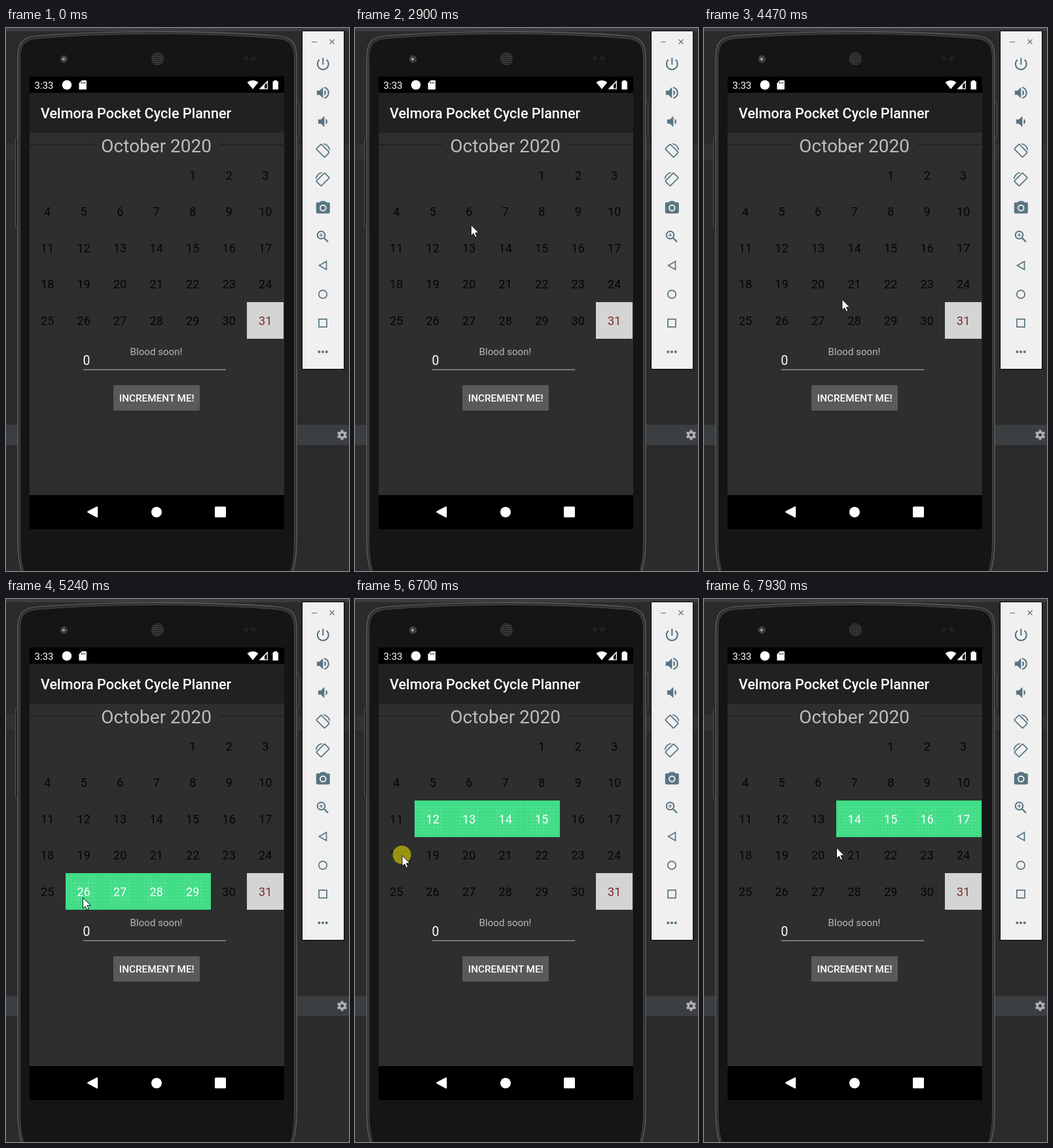
An HTML page for the animation above (8000 ms loop, 524 by 830 pixels).

```html
<!DOCTYPE html>
<html lang="en">
<head>
<meta charset="utf-8">
<title>Calendar demo</title>
<style>
  html, body { margin: 0; width: 100%; height: 100%; overflow: hidden; background: #2b2b2b; }
  svg { display: block; width: 524px; height: 830px; font-family: Roboto, sans-serif; }
  .medium { font-weight: 500; fill: #fff; }
  .mid { text-anchor: middle; }
  .line { fill: none; stroke: #587482; stroke-width: 1.7; }
  .icon { fill: #587482; }
  .crisp { shape-rendering: crispEdges; }
</style>
</head>
<body>
<svg viewBox="0 0 524 830">
  <defs>
    <pattern id="mesh" width="3" height="3" patternUnits="userSpaceOnUse">
      <rect width="3" height="3" fill="#1c1c1c"/>
      <circle cx="1.5" cy="1.5" r="1" fill="#555"/>
    </pattern>
  </defs>

  <!-- editor behind the phone -->
  <rect width="524" height="830" fill="#2b2b2b"/>
  <rect width="524" height="5" fill="#3a3c3e"/>
  <rect y="177" width="524" height="24" fill="#323232"/>
  <rect y="606.5" width="524" height="31" fill="#3c3f41"/>
  <g transform="translate(513.5 622)" fill="none" stroke="#afb1b3">
    <circle r="4.3" stroke-width="3.4"/>
    <circle r="6.6" stroke-width="2.4" pathLength="12" stroke-dasharray="1 1" stroke-dashoffset="1.5"/>
  </g>

  <!-- phone -->
  <rect x="14.5" y="168" width="4" height="136" rx="1.5" fill="#222" stroke="#555"/>
  <rect x="443" y="113" width="4.5" height="55" rx="1.5" fill="#222" stroke="#555"/>
  <path d="M25 834Q18 815 18 785V45C18 22 26 14 46 12Q130 5.500 231 5.500T416 12C436 14 444 22 444 45V785Q444 815 437 834Z" fill="#303030" stroke="#646464" stroke-width="1.200"/>
  <path d="M28 834Q21.500 815 21.500 785V46C21.500 26 29 18 47 16Q130 9 231 9T415 16C433 18 440.500 26 440.500 46V785Q440.500 815 434 834Z" fill="#151515" stroke="#484848"/>
  <circle cx="88.500" cy="47.500" r="5" fill="#383838" stroke="#555"/>
  <circle cx="88" cy="47.500" r="2.300" fill="#999"/>
  <circle cx="231.500" cy="47" r="10" fill="url(#mesh)"/>
  <g fill="#202020"><circle cx="366.500" cy="46.500" r="3.500"/><circle cx="378" cy="46.500" r="4"/></g>

  <!-- screen -->
  <rect x="36" y="74" width="389" height="692" fill="#000"/>
  <rect x="36" y="99" width="389" height="61" fill="#212121"/>
  <rect x="36" y="160" width="389" height="554" fill="#2e2e2e"/>
  <g fill="#fff">
    <text x="43.500" y="92.500" font-size="15.100">3:33</text>
    <circle cx="93" cy="87" r="7.300"/>
    <path d="M116 80h6q1 0 1 1v12q0 1-1 1h-9.500q-1 0-1-1v-8.500z"/>
    <path d="M115.500 82.500v2.500M118 82.500v2.500M120.500 82.500v2.500" stroke="#000"/>
    <path d="M368.500 83Q377 77 385.500 83L377 93.500Z"/>
    <path d="M400 80v13.500h-13.500z"/>
    <path d="M398.700 83.500v8.700H395v-5z" fill="#000"/>
    <path d="M409.500 80h4.500v1.500h2v12.500h-8.500V81.500h2z"/>
    <path d="M139 732.500v14.500l-13.500-7.300z" stroke="#fff" stroke-width="2.500" stroke-linejoin="round"/>
    <circle cx="230" cy="740" r="8"/>
    <rect x="319" y="731.500" width="17" height="16.500" rx="1.500"/>
  </g>
  <text class="medium" x="53" y="138" font-size="21.600">Velmora Pocket Cycle Planner</text>
  <path d="M36 178.500H134M326 178.500H424" stroke="#1a1a1a" stroke-width="1.200"/>
  <text class="mid" x="229.700" y="189.500" font-size="28" fill="#bdbdbd">October 2020</text>
  <g id="days" class="mid" font-size="18"></g>
  <text class="mid" x="229.500" y="500" font-size="15.100" fill="#b8b8b8">Blood soon!</text>
  <text x="117.500" y="515" font-size="19.500" fill="#fff">0</text>
  <path d="M118 522.300H336" stroke="#c0c0c0" stroke-width="1.100"/>
  <rect x="164" y="547" width="132" height="39" rx="2" fill="#252525"/>
  <rect x="164" y="546" width="132" height="39" rx="2" fill="#5a5a5a"/>
  <text class="medium mid" x="230.300" y="571.300" font-size="15.300">INCREMENT ME!</text>

  <!-- emulator controls -->
  <rect x="452.500" y="4.500" width="64" height="517" fill="#f0f0f0" stroke="#000"/>
  <path d="M467 21.500h8M494.500 17.500l7 7m0-7l-7 7" class="line" style="stroke-width:1.200"/>
  <g class="icon" fill-rule="evenodd">
    <path transform="translate(471.700 42.400) scale(1.050)" d="M13 3h-2v10h2V3zm4.830 2.170l-1.420 1.420C17.990 7.860 19 9.810 19 12c0 3.870-3.130 7-7 7s-7-3.130-7-7c0-2.190 1.010-4.140 2.580-5.420L6.170 5.170C4.230 6.820 3 9.260 3 12c0 4.970 4.030 9 9 9s9-4.030 9-9c0-2.740-1.230-5.180-3.170-6.830z"/>
    <path transform="translate(471.700 86.400) scale(1.050)" d="M3 9v6h4l5 5V4L7 9H3zm13.500 3c0-1.770-1.020-3.290-2.500-4.030v8.050c1.480-.73 2.500-2.250 2.500-4.020zM14 3.230v2.060c2.890.86 5 3.540 5 6.710s-2.110 5.850-5 6.710v2.060c4.010-.91 7-4.490 7-8.770s-2.990-7.860-7-8.770z"/>
    <path transform="translate(471.700 130.400) scale(1.050)" d="M18.500 12c0-1.770-1.020-3.290-2.500-4.030v8.050c1.480-.73 2.500-2.250 2.500-4.020zM5 9v6h4l5 5V4L9 9H5z"/>
    <path transform="translate(471.700 262.400) scale(1.050)" d="M9 2L7.170 4H4c-1.100 0-2 .9-2 2v12c0 1.100.9 2 2 2h16c1.100 0 2-.9 2-2V6c0-1.100-.9-2-2-2h-3.170L15 2H9zm3 15a5 5 0 0 1 0-10 5 5 0 0 1 0 10zm0-1.800a3.200 3.200 0 0 0 0-6.400 3.200 3.200 0 0 0 0 6.400z"/>
  </g>
  <g class="line">
    <g id="turn" transform="translate(484 187.500)">
      <rect x="-5.300" y="-9" width="10.600" height="18" rx="1" transform="rotate(-45)"/>
      <path d="M1 -10.500A11 11 0 0 1 10.500 -1"/>
    </g>
    <use href="#turn" transform="matrix(-1 0 0 1 968 44)"/>
    <circle cx="481.500" cy="316.500" r="5.800" stroke-width="2"/>
    <path d="M486 321l6 6" stroke-width="2.400"/>
    <path d="M478.500 316.500h6m-3-3v6" stroke-width="1.200"/>
    <path d="M478.500 363l11-6.300v12.600z"/>
    <circle cx="484" cy="407" r="6.200"/>
    <rect x="478" y="445" width="12" height="12"/>
  </g>
  <g class="icon"><circle cx="478.300" cy="495" r="2.100"/><circle cx="484" cy="495" r="2.100"/><circle cx="489.700" cy="495" r="2.100"/></g>

  <circle id="touch" r="14" fill="#b5af0a" fill-opacity=".8"/>
  <path id="cursor" d="M0 0V16.500L3.800 13 6.300 18.800 9 17.600 6.500 12H11.800Z" fill="#fff" stroke="#000" stroke-width=".9"/>
</svg>
<script>
const LOOP = 8000, CELL = 55.5, LEFT = 35.4, TOP = 197.3, SPAN = 4;
const NS = 'http://www.w3.org/2000/svg';
const $ = id => document.getElementById(id);

// start, end, steps, x, y, deceleration
const moves = [
  [120, 890, 11, 211, 339, 1.6],
  [970, 1280, 5, 177, 285, 1.3],
  [2900, 3130, 4, 178, 342, 1.15],
  [4320, 4540, 4, 222, 439, 1],
  [4620, 5090, 7, 117.5, 456.5, 1.3],
  [5640, 6240, 9, 118, 345, 1.2],
  [6470, 6620, 3, 72, 392, 1],
  [6930, 7310, 6, 215, 354, 1.2],
  [7700, 7930, 4, 202.5, 380, 1]
];
// finger down, finger up, first selected day (0 clears)
const taps = [
  [1430, 1510, 6], [2520, 2600, 0], [3300, 3370, 13], [4000, 4150, 0],
  [5160, 5240, 26], [6310, 6390, 12], [6700, 6780, 18], [7390, 7470, 14]
];

function add(parent, tag, attrs) {
  const el = document.createElementNS(NS, tag);
  for (const key in attrs) el.setAttribute(key, attrs[key]);
  return parent.appendChild(el);
}

// Grid on a 108-unit tile, with a second set of lines in the middle.
function gridPath() {
  let d = '';
  const pair = (p, a, b) => d += `M${p} ${a}V${b}M${a} ${p}H${b}`;
  for (let p = 9; p < 108; p += 10) pair(p, 0, 108);
  for (let p = 29; p < 80; p += 10) pair(p, 19, 89);
  return d;
}

const grid = gridPath();
const days = Array.from({ length: 31 }, (_, i) => {
  const slot = i + 4, x = LEFT + slot % 7 * CELL, y = TOP + Math.floor(slot / 7) * CELL;
  const g = add($('days'), 'g', { transform: `translate(${x} ${y})` });
  const last = i === 30;
  const fill = (parent, color) =>
    add(parent, 'rect', { width: CELL + .4, height: CELL + .4, fill: color, class: 'crisp' });
  if (last) fill(g, '#d3d5d4');
  const tile = add(g, 'g', {});
  fill(tile, '#3ddc84');
  add(tile, 'path', {
    d: grid, transform: `scale(${CELL / 108})`,
    fill: 'none', stroke: '#fff', 'stroke-opacity': .2, 'stroke-width': .8
  });
  const label = add(g, 'text', { x: CELL / 2 + .1, y: 34.7 });
  label.textContent = i + 1;
  return { tile, label, ink: last ? '#7d2a2a' : '#050505' };
});

function cursorAt(t) {
  let x = 507, y = 871;
  for (const [start, end, steps, toX, toY, power] of moves) {
    if (t < start) break;
    const step = Math.floor((t - start) / (end - start) * (steps - 1) + .1);
    const u = 1 - (1 - Math.min(1, (step + 1) / steps)) ** power;
    x += (toX - x) * u;
    y += (toY - y) * u;
  }
  return [x, y];
}

let shown = -1;
function select(first) {
  if (first === shown) return;
  shown = first;
  days.forEach(({ tile, label, ink }, i) => {
    const on = first > 0 && i + 1 >= first && i + 1 < first + SPAN;
    tile.setAttribute('visibility', on ? 'visible' : 'hidden');
    label.setAttribute('fill', on ? '#fff' : ink);
  });
}

function draw(t) {
  const [x, y] = cursorAt(t);
  $('cursor').setAttribute('transform', `translate(${x} ${y})`);
  $('touch').setAttribute('transform', `translate(${x - .5} ${y - 1})`);
  $('cursor').setAttribute('visibility', t < 120 ? 'hidden' : 'visible');
  const pressed = taps.some(([down, up]) => t >= down && t < up);
  $('touch').setAttribute('visibility', pressed ? 'visible' : 'hidden');
  select(taps.reduce((first, [, up, day]) => t >= up ? day : first, 0));
}

const began = performance.now();
function tick() {
  draw((performance.now() - began) % LOOP);
  requestAnimationFrame(tick);
}
tick();
</script>
</body>
</html>
```
